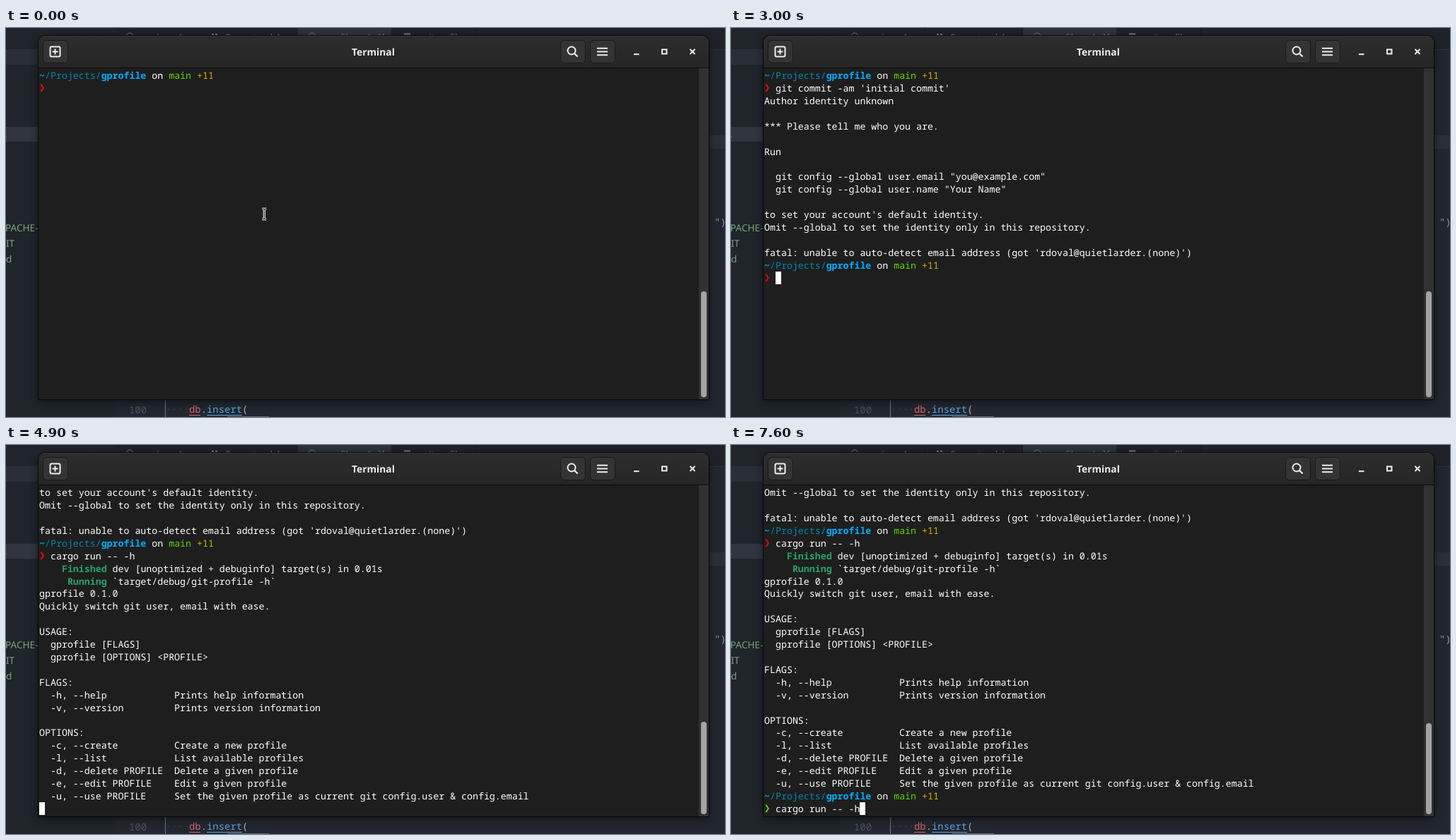
An HTML page that plays this animation: 1017 px wide and 551 px high, repeating every 8 s.

```html
<!DOCTYPE html>
<html lang="en">
<head>
<meta charset="utf-8">
<title>Terminal</title>
<style>
html, body { margin: 0; width: 100%; height: 100%; overflow: hidden; background: #22262e; }
#stage { position: relative; width: 1017px; height: 551px; overflow: hidden; text-rendering: geometricPrecision; }
#stage svg { position: absolute; left: 0; top: 0; }
.ui { font-family: "Noto Sans", "Open Sans", sans-serif; }
.mono, #rows, #cursor { font-family: "Noto Sans Mono", "DejaVu Sans Mono", monospace; }
#win {
  position: absolute; left: 46px; top: 11px; width: 948px; height: 515px;
  border-radius: 9px 9px 1px 1px; background: #1e1e1e; overflow: hidden;
  box-shadow: 0 0 0 1px rgba(0,0,0,.75), 0 3px 12px 1px rgba(0,0,0,.45);
}
#head {
  height: 45px; background: linear-gradient(#2d2d2d, #262626);
  border-bottom: 1px solid #0b0b0b; box-shadow: inset 0 1px #383838;
}
#track { position: absolute; right: 0; top: 46px; bottom: 0; width: 14px; background: #313131; }
#thumb { position: absolute; left: 983px; width: 8px; border-radius: 4px; background: #a4a4a3; }
#rows, #cursor { font-size: 13.27px; line-height: 17.92px; white-space: pre; color: #fff; }
#rows { position: absolute; left: 47.1px; top: 59.2px; }
#rows div { position: relative; height: 17.92px; }
#cursor { position: absolute; width: 8px; height: 17.92px; background: #fff; color: #1e1e1e; }
.arrow {
  position: absolute; left: -.4px; top: 0; font-size: 14.5px; font-weight: bold;
  font-family: "DejaVu Sans Mono", "DejaVu Sans", monospace;
}
.dir { color: #0087af; }
.base { color: #00afff; font-weight: bold; }
.ok { color: #5fd700; }
.err { color: #f00; }
.num { color: #d7af00; }
.done { color: #26a269; font-weight: bold; }
.ghost { color: #5e5c64; }
</style>
</head>
<body>
<div id="stage">
  <!-- editor behind the window -->
  <svg width="1017" height="551">
    <rect width="1017" height="551" fill="#22262e"/>
    <rect width="155" height="551" fill="#20242b"/>
    <rect x="155" width="862" height="30" fill="#1f2329"/>
    <rect x="413" width="132" height="30" fill="#2d323c"/>
    <path d="M274.5 0V11M412.5 0V11M664.5 0V11" stroke="#181b20"/>
    <rect y="30" width="46" height="22" fill="#292e37"/>
    <rect y="140" width="46" height="21" fill="#30353f"/>
    <rect x="990" y="30" width="27" height="1" fill="#2b303a"/>
    <rect x="990" y="152" width="27" height="19" fill="#2a2f39"/>
    <g class="ui" font-size="13" fill="#737984">
      <circle cx="175" cy="12" r="5" fill="none" stroke="#737984"/>
      <circle cx="433" cy="12" r="5" fill="none" stroke="#737984"/>
      <path d="M291 9h3M296 9h3M563 8.500h9" stroke="#737984" stroke-width="2"/>
      <path d="M527 8l8 8m0-8l-8 8" stroke="#9a9fa8"/>
      <text x="194" y="18">main.rs 1</text>
      <text x="309" y="18">Cargo.toml 4</text>
      <text x="452" y="18">profile.rs 1</text>
      <text x="587" y="18">.gitprofile</text>
      <text x="-5" y="156">s</text>
      <g fill="#77a57b" font-size="13.6">
        <text x="-1" y="287.500">PACHE-</text>
        <text x="0" y="309.500">IT</text>
        <text x="0" y="331.500">d</text>
      </g>
    </g>
    <g class="mono" font-size="13.9">
      <text x="174" y="546" fill="#495162">100</text>
      <text x="226" y="545" fill="#3d434d">····</text>
      <text x="259" y="545" fill="#abb2bf"><tspan fill="#d8656f">db</tspan>.<tspan fill="#5ba5e2">insert</tspan>(</text>
      <text x="1002" y="280" fill="#8e959f">")</text>
    </g>
    <path d="M225.500 526V551" stroke="#707682"/>
    <path d="M259 548.500h16" stroke="#d8656f"/>
    <path d="M284 548.500h50" stroke="#5ba5e2"/>
    <path d="M313 550.500h59" stroke="#646a75"/>
  </svg>

  <div id="win"><div id="head"></div><div id="track"></div></div>

  <!-- header bar controls -->
  <svg width="1017" height="58">
    <g fill="#343434" stroke="#191919">
      <rect x="52.500" y="17.500" width="35" height="32" rx="5"/>
      <rect x="784.500" y="17.500" width="35" height="32" rx="5"/>
      <rect x="826.500" y="17.500" width="35" height="32" rx="5"/>
    </g>
    <g fill="none" stroke="#eee" stroke-width="2">
      <rect x="62.500" y="26.500" width="14" height="14" rx="2"/>
      <path d="M69.500 29.500v8M65.500 33.500h8"/>
      <circle cx="800" cy="32" r="5.500"/>
      <path d="M804 36l4.500 4.500" stroke-width="2.400"/>
      <path d="M836 28.700h15M836 33.500h15M836 38.300h15"/>
      <path d="M888 37.200h7.500"/>
      <rect x="928" y="30.500" width="6.500" height="6"/>
      <path d="M967.500 30l7 7m0-7l-7 7"/>
    </g>
    <text class="ui" x="519.500" y="38.500" text-anchor="middle" font-size="13.8" font-weight="700" fill="#eee">Terminal</text>
  </svg>

  <div id="rows"></div>
  <div id="cursor"></div>
  <div id="thumb"></div>
  <svg id="mouse" width="1017" height="551" fill="none">
    <defs>
      <path id="beam" d="M362.500 256h1.500l1.300 1l1.300-1h1.500M365.300 257v13M362.500 271h1.500l1.300-1l1.300 1h1.500"/>
    </defs>
    <use href="#beam" stroke="#fff" stroke-width="3.200"/>
    <use href="#beam" stroke="#111" stroke-width="1.100"/>
  </svg>
</div>
<script>
const LOOP = 8000, VISIBLE = 26;
const CELL = 7.96, LINE = 17.92, LEFT = 46.9, TOP = 58.4;
const $ = id => document.getElementById(id);
const esc = s => s.replace(/&/g, '&amp;').replace(/</g, '&lt;');
const span = (cls, s) => `<span class="${cls}">${esc(s)}</span>`;
const input = (state, typed, ghost = '') =>
  span('arrow ' + state, '❯') + '  ' + esc(typed) + span('ghost', ghost);

const prompt = span('base', '~') + span('dir', '/Projects/') + span('base', 'gprofile') +
  ' on ' + span('ok', 'main') + ' ' + span('num', '+11');
const commit = "git commit -am 'initial commit'";
const help = 'cargo run -- -h';
const cd = 'cd ~/Projects/gprofile';

const commitOut = `Author identity unknown

*** Please tell me who you are.

Run

  git config --global user.email "you@example.com"
  git config --global user.name "Your Name"

to set your account's default identity.
Omit --global to set the identity only in this repository.

fatal: unable to auto-detect email address (got 'rdoval@quietlarder.(none)')`;

const helpOut = `gprofile 0.1.0
Quickly switch git user, email with ease.

USAGE:
  gprofile [FLAGS]
  gprofile [OPTIONS] <PROFILE>

FLAGS:
  -h, --help            Prints help information
  -v, --version         Prints version information

OPTIONS:
  -c, --create          Create a new profile
  -l, --list            List available profiles
  -d, --delete PROFILE  Delete a given profile
  -e, --edit PROFILE    Edit a given profile
  -u, --use PROFILE     Set the given profile as current git config.user & config.email`;

const log = [
  prompt, input('err', commit), ...esc(commitOut).split('\n'),
  prompt, input('err', help),
  '    ' + span('done', 'Finished') + ' dev [unoptimized + debuginfo] target(s) in 0.01s',
  '     ' + span('done', 'Running') + ' `target/debug/git-profile -h`',
  ...esc(helpOut).split('\n'), prompt
];

// time, finished lines, prompt state ('' = program running), command, typed length, cursor shown
const steps = [
  [0, 1, 'err', '', 0, false],
  [600, 1, 'err', '', 0, true],
  [1200, 1, 'err', commit, 1, true],
  [1300, 1, 'err', commit, commit.length, true],
  [1800, 2, '', '', 0, true],
  [1900, 15, '', '', 0, true],
  [2000, 16, 'err', '', 0, true],
  [2500, 16, 'err', '', 0, false],
  [3000, 16, 'err', '', 0, true],
  [3500, 16, 'err', cd, 1, true],
  [3700, 16, 'err', help, 2, true],
  [4400, 16, 'err', help, help.length, true],
  [4900, 36, '', '', 0, true],
  [5100, 37, 'ok', '', 0, true],
  [5400, 37, 'ok', '', 0, false],
  [5900, 37, 'ok', '', 0, true],
  [6700, 37, 'ok', '', 0, false],
  [7300, 37, 'ok', help, 1, true],
  [7600, 37, 'ok', help, help.length, true]
];

function show([time, count, state, command, typed, blink]) {
  const live = state ? input(state, command.slice(0, typed), command.slice(typed)) : '';
  const lines = [...log.slice(0, count), live].slice(-VISIBLE);
  $('rows').innerHTML = lines.map(s => `<div>${s}</div>`).join('');

  const cursor = $('cursor'), col = state ? 2 + typed : 0;
  cursor.style.left = LEFT + col * CELL + 'px';
  cursor.style.top = TOP + (lines.length - 1) * LINE + 'px';
  cursor.style.visibility = blink ? 'visible' : 'hidden';
  cursor.textContent = command[typed] || '';

  const top = count < 36 ? 373 : count === 36 ? 392 : 394;
  $('thumb').style.top = top + 'px';
  $('thumb').style.height = 523 - top + 'px';
  $('mouse').style.visibility = time < 1200 ? 'visible' : 'hidden';
}

let current;
function tick() {
  const t = performance.now() % LOOP;
  const step = steps.filter(s => s[0] <= t).pop();
  if (step !== current) show(current = step);
  requestAnimationFrame(tick);
}
tick();
</script>
</body>
</html>
```
